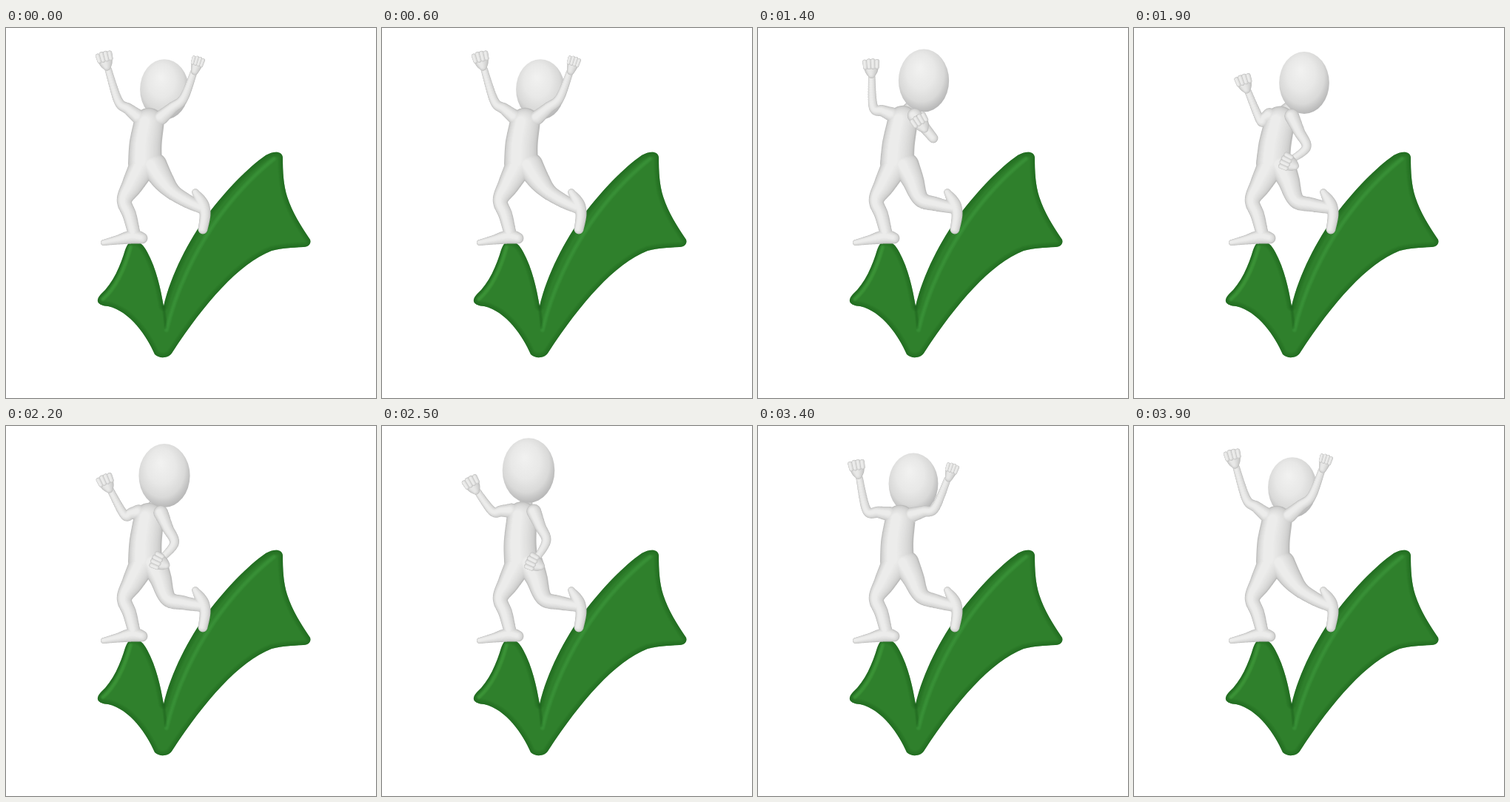
Write an HTML page with a canvas that moves like this. It is 500 px wide and 500 px high and loops after 4 s.

```html
<!DOCTYPE html>
<html lang="en">
<head>
<meta charset="utf-8">
<title>Check mark dance</title>
<style>
html, body { margin: 0; width: 100%; height: 100%; overflow: hidden; background: #fff; }
canvas { display: block; width: 500px; height: 500px; }
</style>
</head>
<body>
<canvas id="stage" width="500" height="500"></canvas>
<script>
const ctx = document.getElementById('stage').getContext('2d');
const LOOP = 4000, STEP = 100, LAYERS = 10;

// Each pose places the head; an arm is an elbow followed by a fist.
const cheer = { head: [214, 83], left: [152, 99, 134, 43], right: [240, 95, 258, 49] };
const press = { head: [210, 78], left: [147, 114, 134, 57], right: [239, 111, 261, 61] };
const block = { head: [224, 71], left: [156, 107, 153, 53], right: [237, 149, 220, 128] };
const guard = { head: [230, 74], left: [171, 125, 149, 74], right: [233, 161, 209, 182] };
const swing = { head: [198, 60], left: [149, 115, 122, 79], right: [222, 155, 206, 185] };
const punch = { head: [206, 63], left: [150, 116, 127, 70], right: [256, 130, 292, 118] };

const dance = [[0, cheer], [600, cheer], [1000, press], [1400, block], [1650, swing],
  [1900, guard], [2500, swing], [2850, punch], [3400, press], [3900, cheer], [LOOP, cheer]];

const mix = (a, b, u) => a + (b - a) * u;
const clamp = (v, low, high) => Math.max(low, Math.min(high, v));

function poseAt(t) {
  const i = dance.findIndex(([time]) => time > t);
  const [t0, a] = dance[i - 1], [t1, b] = dance[i];
  const u = (t - t0) / (t1 - t0), ease = u * u * (3 - 2 * u);
  const blend = part => a[part].map((v, k) => mix(v, b[part][k], ease));
  return { head: blend('head'), left: blend('left'), right: blend('right') };
}

const spline = (a, b, c, d, u) => .5 * (2 * b + (c - a) * u +
  (2 * a - 5 * b + 4 * c - d) * u * u + (3 * b - a - 3 * c + d) * u ** 3);

// Dense discs along a smooth spine; each point is x, y, radius.
function tube(...points) {
  const at = i => points[clamp(i, 0, points.length - 1)];
  const discs = [];
  for (let i = 0; i < points.length - 1; i++) {
    for (let k = 0; k <= 14; k++) {
      discs.push([0, 1, 2].map(j =>
        spline(at(i - 1)[j], at(i)[j], at(i + 1)[j], at(i + 2)[j], k / 14)));
    }
  }
  return discs;
}

// Tubes in one group melt together as a single shaded volume.
function shade(tubes, dark = 188, light = 236) {
  const discs = tubes.flat();
  for (let k = 0; k < LAYERS; k++) {
    const u = k / (LAYERS - 1);
    const g = Math.round(mix(dark, light, Math.sqrt(u)));
    ctx.fillStyle = `rgb(${g},${g},${g - 1})`;
    ctx.beginPath();
    for (const [x, y, r] of discs) {
      const cx = x - r * .28 * u, cy = y - r * .12 * u, cr = r * (1 - .7 * u);
      ctx.moveTo(cx + cr, cy);
      ctx.arc(cx, cy, cr, 0, Math.PI * 2);
    }
    ctx.fill();
  }
}

function fist([ex, ey, x, y], width) {
  const turn = clamp(Math.atan2(x - ex, ey - y), -1.4, 1.3);
  ctx.save();
  ctx.translate(x, y);
  ctx.rotate(turn * .8);
  shade([tube([0, 10, 5], [0, 4, width * .37], [0, -1, width * .44])], 188, 232);
  for (let i = -1.5; i < 2; i++) {
    const fx = i * width * .24;
    shade([tube([fx, Math.abs(i) - 9, width * .14], [fx * .95, 0, width * .13])], 186, 236);
  }
  ctx.restore();
}

function head(x, y, ry) {
  ctx.save();
  ctx.translate(x, y);
  ctx.scale(ry * .805, ry);
  const g = ctx.createRadialGradient(-.15, -.4, .05, -.08, -.15, 1.18);
  g.addColorStop(0, '#f1f1f0');
  g.addColorStop(.45, '#e8e8e7');
  g.addColorStop(.75, '#d9d9d8');
  g.addColorStop(1, '#b4b4b4');
  ctx.fillStyle = g;
  ctx.beginPath();
  ctx.arc(0, 0, 1, 0, Math.PI * 2);
  ctx.fill();
  ctx.restore();
}

const arm = (sx, sy, [ex, ey, fx, fy]) => tube([sx, sy, 10],
  [mix(sx, ex, .5), mix(sy, ey, .5), 7.8], [ex, ey, 6.4],
  [mix(ex, fx, .76), mix(ey, fy, .76), 4.8]);

function figure(t) {
  const { head: [headX, headY], left, right } = poseAt(t);

  // The torso follows the head, and the back knee dips during the dance.
  const chestX = 193 + (headX - 213) * .25, chestY = 128 + (headY - 82) * .25;
  const hipX = 188;
  const dip = Math.sqrt(Math.max(0, Math.sin(Math.PI * (t - 600) / 3300)));
  const kneeX = 225 - 6 * dip, kneeY = 221 + 12 * dip;

  shade([tube([chestX + 4, chestY - 10, 10], [mix(chestX, headX, .5) + 2, chestY - 24, 8])], 185, 225);
  head(headX, headY, 41 + (82 - headY) * .13);

  const torso = tube([chestX, chestY, 20.5], [mix(chestX, hipX, .5) - 2, 157, 22], [hipX, 183, 23]);
  const frontLeg = tube([hipX - 5, 190, 18], [171, 212, 14.5], [160, 233, 10.3],
    [167, 253, 9.5], [173, 277, 8.5]);
  const frontFoot = tube([132, 290, 4], [152, 286, 6.5], [172, 282, 9.5], [184, 284, 7.5]);
  const backLeg = tube([hipX + 12, 186, 18], [mix(hipX, kneeX, .5) + 5, 205, 15],
    [kneeX, kneeY, 11], [mix(kneeX, 262, .5), mix(kneeY, 245, .5), 9.5], [264, 243, 8]);
  const backFoot = tube([256, 222, 4.8], [265, 237, 8.5], [269, 252, 7.5], [266, 272, 6.5]);
  const leftArm = arm(chestX - 14, chestY - 8, left);
  const rightArm = arm(chestX + 16, chestY - 7, right);

  const raised = right[1] < chestY;
  const body = [torso, frontLeg, frontFoot, backLeg, backFoot, leftArm];
  shade(raised ? [...body, rightArm] : body);
  if (!raised) shade([rightArm]);
  fist(left, 23);
  fist(right, raised ? 18 : 24);
}

const mark = new Path2D(`M172 288 C180 288 186 293 191 303 C203 325 209 352 213 376
  C223 333 247 287 272 253 C299 217 328 188 351 172 C362 166 373 166 374 175
  C374 195 375 212 380 228 C387 250 399 268 411 286 C413 292 408 296 402 296
  C385 297 374 297 359 301 C314 319 269 371 225 438 C220 447 207 447 201 441
  C190 416 168 383 138 376 C124 375 120 369 128 360 C145 345 155 320 161 300
  C164 292 167 288 172 288Z`);
const longRidge = new Path2D('M217 408 C230 353 256 302 281 265 C306 229 333 200 362 177');
const shortRidge = new Path2D('M131 366 C149 350 161 322 168 296');
const crease = new Path2D('M213 376 L216 405');

function softStroke(path, color, width, alpha) {
  ctx.strokeStyle = color;
  ctx.globalAlpha = alpha;
  for (let w = width; w > 0; w -= 2) {
    ctx.lineWidth = w;
    ctx.stroke(path);
  }
  ctx.globalAlpha = 1;
}

function checkMark() {
  ctx.save();
  ctx.lineCap = ctx.lineJoin = 'round';
  ctx.fillStyle = '#2f802c';
  ctx.fill(mark);
  ctx.clip(mark);
  softStroke(mark, '#1b581a', 14, .09);
  softStroke(crease, '#1b5a19', 5, .2);
  softStroke(longRidge, '#45a041', 7, .17);
  softStroke(shortRidge, '#48a544', 7, .2);
  ctx.restore();
}

function draw(now) {
  const t = Math.floor((now % LOOP) / STEP) * STEP;
  ctx.fillStyle = '#fff';
  ctx.fillRect(0, 0, 500, 500);
  checkMark();
  figure(t);
}

let start;
function tick(now) {
  start ??= now;
  draw(Math.max(0, now - start));
  requestAnimationFrame(tick);
}
draw(0);
requestAnimationFrame(tick);
</script>
</body>
</html>
```
